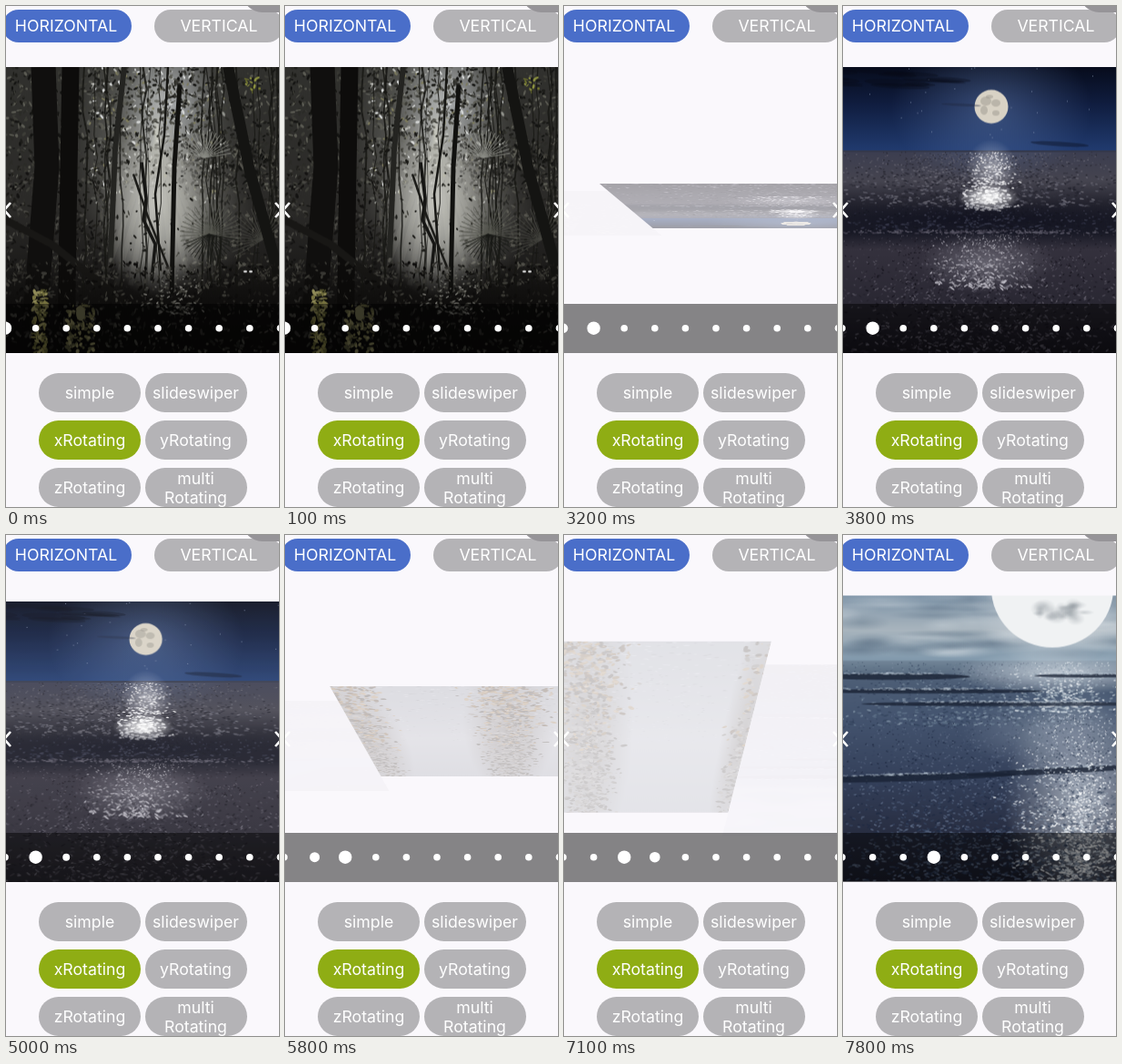
An HTML page with a canvas that plays this animation: 300 by 550 pixels, repeating every 8000 ms.

```html
<!DOCTYPE html>
<html lang="en">
<head>
<meta charset="utf-8">
<title>xRotating carousel</title>
<style>
html, body { margin: 0; width: 100%; height: 100%; overflow: hidden; background: #faf8fc; }
#stage { position: relative; width: 300px; height: 550px; overflow: hidden;
  font: 17.7px/21px Inter, Roboto, sans-serif; color: #fff; text-align: center; }
#stage > *, canvas { position: absolute; box-sizing: border-box; }
#view { left: 0; top: 0; width: 300px; height: 380.5px; overflow: hidden; }
canvas { left: -20px; top: 67px; }
.band { left: 0; top: 327px; width: 300px; height: 54px; background: rgba(0,0,0,.47); }
svg { left: 0; top: 0; }
.btn { display: flex; align-items: center; justify-content: center;
  width: 112px; height: 43px; border-radius: 22px; background: #b4b3b6; }
.tab { top: 3.5px; width: 142px; height: 36px; border-radius: 18px; }
.corner { left: 260px; top: -36px; width: 70px; height: 43px; border-radius: 22px; background: #969498; }
</style>
</head>
<body>
<div id="stage">
  <div id="view"></div>
  <div class="band"></div>
  <svg width="300" height="550">
    <path d="M5 216L-2 224L5 232M296 216L303 224L296 232" fill="none" stroke="#fff" stroke-width="2.6"/>
    <g id="dots" fill="#fff"></g>
  </svg>
  <div class="btn tab" style="left:-4px;padding-right:2px;background:#4a6ec9">HORIZONTAL</div>
  <div class="btn tab" style="left:163px">VERTICAL</div>
  <div class="corner"></div>
</div>
<script>
const W = 340, H = 314, TAU = Math.PI * 2;
const stage = document.getElementById('stage');

['simple', 'slideswiper', 'xRotating', 'yRotating', 'zRotating', 'multi Rotating'].forEach((label, i) => {
  const b = document.createElement('div');
  b.className = 'btn';
  b.textContent = label;
  b.style.left = (i % 2 ? 152.5 : 36) + 'px';
  b.style.top = 403 + 52 * (i >> 1) + 'px';
  if (i === 2) b.style.background = '#8fad14';
  if (i === 5) b.style.padding = '0 15px';
  stage.append(b);
});

const dots = Array.from({ length: 10 }, (_, i) => {
  const c = document.createElementNS('http://www.w3.org/2000/svg', 'circle');
  c.setAttribute('cx', -1 + 33.6 * i);
  c.setAttribute('cy', 353.7);
  document.getElementById('dots').append(c);
  return c;
});

// ---- painting helpers ----
let seed = 7, g;
const rnd = (a = 0, b = 1) => {
  seed = (seed * 1664525 + 1013904223) % 4294967296;
  return a + (b - a) * seed / 4294967296;
};
const bell = () => (rnd() + rnd() + rnd()) / 1.5 - 1;
const pick = list => list[Math.floor(rnd(0, list.length))];

function fade(stops) {
  const f = g.createLinearGradient(0, 0, 0, H);
  stops.forEach(([p, c]) => f.addColorStop(p, c));
  g.fillStyle = f;
  g.fillRect(0, 0, W, H);
}
// Soft elliptical light; color is an "r,g,b" triple
function glow(x, y, rx, ry, color, alpha, turn = 0) {
  g.save();
  g.translate(x, y);
  g.rotate(turn);
  g.scale(rx, ry);
  const f = g.createRadialGradient(0, 0, 0, 0, 0, 1);
  f.addColorStop(0, `rgba(${color},${alpha})`);
  f.addColorStop(.5, `rgba(${color},${alpha * .5})`);
  f.addColorStop(1, `rgba(${color},0)`);
  g.fillStyle = f;
  g.fillRect(-1, -1, 2, 2);
  g.restore();
}
function line(points, width, color) {
  g.beginPath();
  points.forEach(([x, y]) => g.lineTo(x, y));
  g.lineWidth = width;
  g.strokeStyle = color;
  g.lineJoin = 'round';
  g.stroke();
}
function oval(x, y, rx, ry, color, turn = 0) {
  g.beginPath();
  g.ellipse(x, y, rx, ry, turn, 0, TAU);
  g.fillStyle = color;
  g.fill();
}
// n leaf-like dabs scattered in a box
function leaves(n, x, y, w, h, size, colors) {
  while (n--) oval(x + rnd(0, w), y + rnd(0, h), rnd(.3, 1) * size, rnd(.15, .5) * size, pick(colors), rnd(0, TAU));
}
// n small ripples around the column x, growing toward the viewer
function ripples(n, x, y, w, h, colors, tilt = .3) {
  while (n--) {
    const k = rnd();
    oval(x + bell() * w, y + k * h, .8 + k * rnd(.5, 2.6), .4 + k * .4, pick(colors), rnd(-tilt, tilt));
  }
}
// Breaking wave: a dark lens with a few pale flecks on its crest
function wave(x, y, w, h, tilt = 0) {
  oval(x, y, w, h, 'rgba(24,33,50,.8)', tilt);
  for (let i = 0; i < w * .8; i++) {
    const u = bell() * w;
    oval(x + u, y - h + u * tilt + rnd(-1, 1), rnd(.6, 3), .5, 'rgba(190,203,216,.5)', tilt);
  }
}
function frond(x, y, r, from, to, color) {
  for (let a = from; a < to; a += .16) line([[x, y], [x + r * Math.cos(a), y + r * Math.sin(a)]], .9, color);
}

// ---- the four pictures ----
function forest() {
  fade([[0, '#31312e'], [.5, '#2b2a28'], [.75, '#191817'], [1, '#0f0e0d']]);
  glow(185, 85, 95, 170, '160,161,155', .65);
  glow(198, 40, 55, 75, '200,204,208', .7);
  leaves(420, 110, 0, 150, 150, 3.2, ['#b5b6b0', '#8f908a', '#d2d4d3', '#60615b', '#7d7b5c']);
  leaves(1500, 20, 0, 320, 135, 3.4, ['#141412', '#1d1d1a', '#2b2b27', '#3d3d37', '#5b5b53']);
  leaves(800, 0, 110, 140, 130, 3.4, ['#141312', '#1f1e1b', '#32312d', '#484742']);
  leaves(800, 215, 80, 125, 160, 3.4, ['#141412', '#22211e', '#383732', '#52514a']);
  glow(185, 150, 62, 105, '222,222,216', .9);
  glow(205, 165, 85, 85, '165,165,158', .5);
  for (let i = 0; i < 9; i++) line([[205 - i * 5, 20], [125 + i * 16, 240]], 6, 'rgba(230,230,222,.06)');
  for (let i = 0; i < 26; i++) {
    const x = rnd(95, 330), pts = [];
    for (let y = 0; y <= 250; y += 25) pts.push([x + rnd(-3, 3), y]);
    line(pts, rnd(.6, 2.2), 'rgba(24,24,21,.85)');
  }
  leaves(260, 120, 0, 120, 245, 3, ['#1a1a17', '#33332e', '#45453f']);
  frond(245, 184, 34, 2.6, 6.5, '#55564f');
  frond(243, 184, 30, .2, 2.8, '#191a17');
  frond(238, 100, 30, 3.4, 6.2, '#8c8d86');
  frond(302, 190, 36, 2.6, 5.8, '#45453f');
  line([[61, 0], [65, 110], [49, 314]], 27, '#100f0e');
  line([[91, 0], [88, 170], [86, 314]], 19, '#0d0c0b');
  line([[150, 0], [140, 90], [135, 210]], 6, '#242421');
  line([[211, 20], [205, 110], [202, 250]], 5, '#11110f');
  line([[169, 105], [174, 145], [171, 168], [184, 195], [180, 235]], 3.5, '#161614');
  line([[160, 118], [176, 165], [198, 220]], 2.5, '#1b1b18');
  line([[198, 0], [194, 75], [184, 140], [190, 225]], 2.5, '#171714');
  line([[264, 0], [288, 115], [326, 250]], 12, '#141412');
  line([[322, 0], [338, 150]], 9, '#1c1c19');
  line([[0, 158], [70, 195], [154, 262]], 8, '#181715');
  fade([[0, 'rgba(8,7,6,0)'], [.68, 'rgba(8,7,6,0)'], [.85, 'rgba(8,7,6,.6)'], [1, 'rgba(8,7,6,.7)']]);
  leaves(900, 0, 215, W, 99, 3.5, ['#0d0c0b', '#1a1917', '#282724', '#393833']);
  ripples(130, 205, 222, 45, 50, ['#6b6a64', '#8f8e87', '#4a4944'], .8);
  leaves(110, 50, 245, 15, 69, 4, ['#75713f', '#54532d', '#8f8a58']);
  leaves(100, 87, 262, 30, 52, 4, ['#5f5d3c', '#474630', '#7b7752']);
  oval(102, 271, 5, 8, '#6d6a4c');
  oval(283, 225, 2, 1.2, '#ddd');
  oval(289, 225, 2, 1.2, '#ddd');
  leaves(14, 282, 12, 18, 18, 3, ['#75792d', '#8c9140']);
}

function nightSea() {
  fade([[0, '#070c1c'], [.13, '#101d3f'], [.295, '#213b6f'], [.3, '#3c3e50'], [.4, '#45444f'], [.48, '#22222d'], [.58, '#181925'], [.64, '#34313d'], [.82, '#2a2833'], [1, '#17151d']]);
  glow(183, 46, 110, 85, '115,145,200', .4);
  for (let i = 0; i < 30; i++) oval(rnd(0, W), rnd(0, 85), .5, .5, '#8e9cb8');
  for (let i = 0; i < 14; i++) oval(rnd(0, 140), rnd(5, 22), rnd(15, 38), rnd(1, 4), 'rgba(6,10,22,.35)', .05);
  oval(183, 44, 18.5, 18.5, '#d8d2c5');
  [[177, 38, 6, 5], [188, 40, 5, 4], [175, 48, 4, 5], [188, 51, 4, 3], [181, 33, 4, 2]].forEach(([x, y, a, b]) => oval(x, y, a, b, 'rgba(150,146,138,.45)'));
  oval(150, 42, 22, 1.5, 'rgba(30,38,60,.4)', .05);
  oval(258, 85, 32, 2.5, 'rgba(15,22,45,.5)', .06);
  g.fillStyle = '#34384a';
  g.fillRect(0, 92, W, 2);
  ripples(1500, 170, 94, 230, 60, ['#25252f', '#575764', '#6a6974', '#30303b']);
  glow(183, 112, 28, 32, '235,235,240', .5);
  ripples(420, 183, 94, 36, 64, ['#b8b8c0', '#e9e9ed', '#fff']);
  glow(180, 144, 34, 15, '255,255,255', .95);
  glow(170, 167, 240, 18, '17,18,31', .9);
  ripples(500, 170, 155, 240, 24, ['#14151f', '#2b2d3e', '#3a3c4e', '#1c1d29']);
  ripples(280, 170, 179, 240, 4, ['#5a5866', '#3d3b49']);
  ripples(2400, 170, 182, 260, 132, ['#16141d', '#4d4a57', '#5e5b67', '#24222c', '#3a3743'], .8);
  glow(178, 215, 75, 34, '190,188,200', .35);
  ripples(420, 175, 184, 75, 60, ['#94929b', '#bebcc5', '#6f6d78'], .8);
}

function mistyLake() {
  fade([[0, '#a8adb3'], [.5, '#b9bdc2'], [1, '#a2a8ae']]);
  const grays = ['#6b675f', '#88847c', '#999690', '#57534b'];
  const golds = ['#7c6340', '#94774c', '#4a443a', '#a58a62', '#5c4a34'];
  const grove = (x, w, n) => {
    glow(x, 157, w * .8, 260, '95,88,78', .75);
    while (n--) {
      const y = rnd(0, H), s = rnd(1, 4);
      oval(x + bell() * w * (.6 + .4 * y / H), y, s, s * .6, pick(y / H > rnd(.3, 1) ? golds : grays), rnd(0, TAU));
    }
  };
  grove(8, 55, 900);
  grove(165, 62, 1200);
  grove(335, 30, 250);
  ripples(700, 170, 150, 250, 164, ['rgba(225,229,234,.35)', 'rgba(60,60,58,.2)'], .1);
}

function daySea() {
  fade([[0, '#7d93a7'], [.12, '#a8b4bd'], [.225, '#8199ac'], [.23, '#6f8396'], [.3, '#4b5c74'], [.42, '#43536e'], [.65, '#323e58'], [.85, '#252a3d'], [1, '#1a1c2a']]);
  for (let i = 0; i < 60; i++) glow(rnd(0, W), rnd(0, 66), rnd(20, 55), rnd(4, 10), pick(['215,222,227', '75,98,120']), .3);
  glow(250, -8, 90, 90, '255,255,255', .8);
  oval(250, -8, 67, 65, '#f0f2f3');
  for (let i = 0; i < 22; i++) glow(255 + bell() * 36, 17 + bell() * 15, rnd(5, 13), rnd(3, 9), '135,143,150', .35);
  ripples(1300, 170, 73, 230, 70, ['#34445d', '#7d8fa3', '#5c6f86', '#46566f']);
  ripples(2600, 160, 130, 240, 184, ['#1f2a42', '#4c5a75', '#34425d', '#5c6a84'], .5);
  glow(258, 85, 120, 24, '225,232,238', .75);
  ripples(500, 258, 73, 80, 55, ['#b4c0ca', '#e4e9ed', '#8c9cac']);
  wave(75, 89, 85, 3.5);
  wave(290, 88, 60, 2);
  wave(110, 105, 130, 2.5);
  wave(200, 119, 160, 2.5);
  glow(282, 225, 85, 125, '215,222,229', .7);
  glow(240, 150, 90, 40, '175,188,202', .35);
  wave(90, 200, 120, 4, -.03);
  wave(260, 192, 105, 3.5, -.05);
  ripples(1700, 275, 130, 95, 184, ['#9ca8b7', '#d4dbe2', '#f5f7f8', '#566378', '#36435a'], .6);
  ripples(450, 286, 198, 45, 110, ['#fff', '#dfe4e9', '#b3bdc8'], .6);
}

const slides = [forest, nightSea, mistyLake, daySea].map(paint => {
  const c = document.createElement('canvas');
  c.width = W;
  c.height = H;
  g = c.getContext('2d');
  paint();
  document.getElementById('view').append(c);
  return c;
});

// ---- motion: each swipe is a drag, then a settle after release ----
const swipes = [
  { at: 2700, release: 3000, drag: .35, from: 0, to: 1, settle: 800 },
  { at: 4200, release: 4550, drag: .32, from: 1, to: 1, settle: 800 },
  { at: 5400, release: 5600, drag: .24, from: 1, to: 2, settle: 750 },
  { at: 6800, release: 7100, drag: .35, from: 2, to: 3, settle: 750 }
];

function position(t) {
  const s = swipes.filter(w => t >= w.at).pop();
  if (!s) return 0;
  if (t < s.release) return s.from + .046 + (s.drag - .046) * (t - s.at) / (s.release - s.at);
  const left = Math.max(0, 1 - (t - s.release) / s.settle) ** 3;
  return s.to + (s.from + s.drag - s.to) * left;
}

function draw(now) {
  const pos = position(Math.floor(now % 8000 / 100) * 100);
  slides.forEach((c, i) => {
    const d = i - pos, far = Math.min(1, Math.abs(d));
    c.style.visibility = far < 1 ? 'visible' : 'hidden';
    c.style.opacity = (1 - far) ** 3;
    c.style.transform = `translate(${d * W}px, -.5px) perspective(925px) rotateX(${far * 360}deg)`;
  });
  dots.forEach((c, i) => {
    const near = Math.max(0, 1 - Math.abs(i - pos));
    c.setAttribute('r', 3.8 + 3.4 * Math.min(1, near / .6));
  });
}

let start;
function tick(now) {
  start ??= now;
  draw(now - start);
  requestAnimationFrame(tick);
}
draw(0);
requestAnimationFrame(tick);
</script>
</body>
</html>
```
